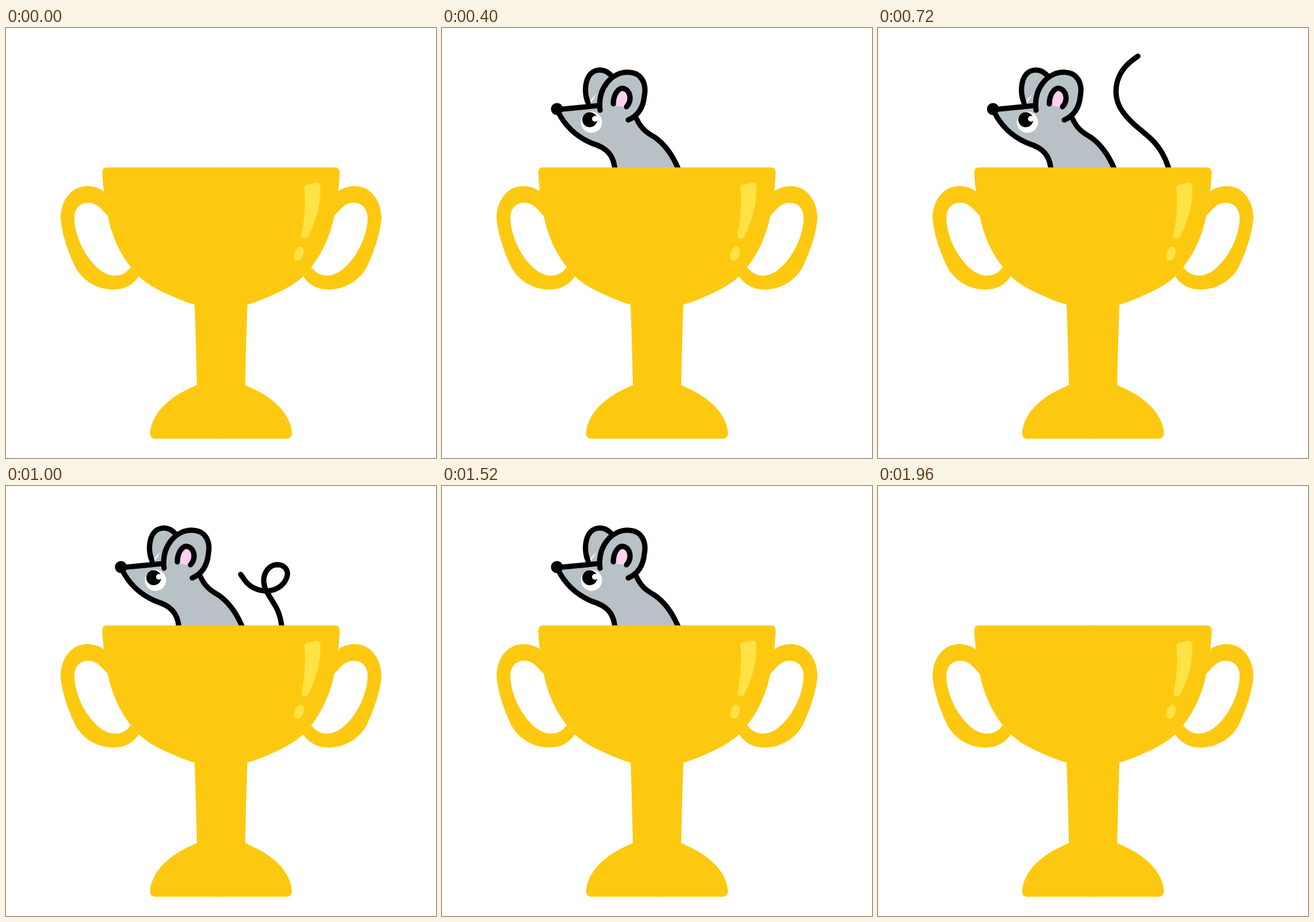
An HTML page that plays this animation: 748x748 px, repeating every 2810 ms.

```html
<!DOCTYPE html>
<html lang="en">
<head>
<meta charset="utf-8">
<title>Mouse in a trophy</title>
<style>
  html, body { margin: 0; width: 100%; height: 100%; overflow: hidden; background: #fff; }
  svg { display: block; }
  .line { fill: none; stroke: #000; stroke-width: 9.2; stroke-linecap: round; stroke-linejoin: round; }
  .fur { fill: #b7c1c6; }
</style>
</head>
<body>
<svg width="100%" height="100%" viewBox="0 0 748 748">
  <!-- Everything in here is hidden below the rim -->
  <svg width="748" height="243" overflow="hidden">
    <path id="tail" class="line"/>
    <g id="mouse">
      <path class="line fur" d="M254 130C245 109 249 74 274 73C285 73 292 79 297 86"/>
      <path class="fur" d="M202 142L256 135L285 90L338 157C346 175 356 182 370 190C390 204 403 224 413 250H301C301 220 285 208 262 201C235 190 215 172 202 146Z"/>
      <path class="line" d="M202 146C215 172 235 190 262 201C285 208 300 220 301 250M338 157C346 175 356 182 370 190C390 204 403 224 413 250"/>
      <path class="fur" d="M275 143C270 105 295 76 325 77C348 78 356 98 352 118C350 140 340 153 324 160Z"/>
      <path class="line" d="M200 142L272 135M275 143C270 105 295 76 325 77C348 78 356 98 352 118C350 140 340 153 324 160"/>
      <path fill="#ffd0f0" d="M303 135C303 119 309 109 315 110C323 113 326 127 319 138Z"/>
      <path class="line" d="M298 132C298 115 307 104 315 105C327 107 332 125 321 137"/>
      <circle cx="200" cy="141" r="10.5"/>
      <circle cx="260" cy="164" r="18.5" fill="#fff"/>
      <circle cx="257" cy="159.500" r="13"/>
      <circle cx="266" cy="158" r="5" fill="#fff"/>
    </g>
  </svg>
  <g fill="#fdc910">
    <g id="half">
      <path d="M376 242.500H175Q167.500 243 167.500 252C168 262 169 273 170 284C172 300 174 314 177 327C184 362 198 392 217 416L231 432C249 449 270 458 290 467Q312 477 328 481C330 530 331 575 332 621C315 629 299 636 286 647C262 665 251 688 250.500 706Q252 714.500 260 714.500H376Z"/>
      <path d="M170 284C160 277 150 275 140 275C112 276 95 302 95 330C96 355 108 390 121 417C135 441 160 455 187 455C207 455 222 446 231 432L217 416C207 430 188 438 165 422C138 402 120 362 119 333C118 316 127 304 143 304C160 304 168 318 177 327Z"/>
    </g>
    <use href="#half" transform="matrix(-1 0 0 1 748 0)"/>
  </g>
  <g fill="#ffe245">
    <path d="M519 277Q520 272 525 272L541 269Q547 270 547 276C548 305 540 335 526 362Q522 367 517 366Q513 363 514 358C518 340 522 310 519 277Z"/>
    <path d="M511 380Q518 380 518 389Q516 404 508 405Q500 404 501 397Q504 382 511 380Z"/>
  </g>
</svg>
<script>
const LOOP = 2810, STEP = 40;
const mouse = document.getElementById('mouse');
const tail = document.getElementById('tail');

// Headings in degrees, evenly spaced from the root of the tail to its tip
const rising = [90, 90, 90, 90, 90, 90, 90, 90, 110, 130, 155, 180];
const upright = [110, 120, 131, 140, 140, 134, 125, 105, 86, 68, 50, 36];
const looped = [95, 107, 123, 120, 88, 42, -20, -105, -145, -178, -205, -235];
const coiled = [106, 88, 10, -65, -125, -180, -188, -213, -240, -275, -312, -362];

const poses = [
  { t: 400, x: 520, y: 470, length: 243, bend: rising },
  { t: 520, x: 520, y: 407, length: 243, bend: rising },
  { t: 720, x: 506, y: 245, length: 243, bend: upright },
  { t: 1000, x: 481, y: 259, length: 276, bend: looped },
  { t: 1240, x: 495, y: 248, length: 276, bend: coiled },
  { t: 1520, x: 525, y: 342, length: 276, bend: coiled }
];

const mix = (a, b, k) => a + (b - a) * k;
const clamp = (v, lo, hi) => Math.min(hi, Math.max(lo, v));

function tailPath(t) {
  if (t <= poses[0].t || t >= poses.at(-1).t) return '';
  const i = poses.findIndex(p => p.t > t);
  const a = poses[i - 1], b = poses[i], k = (t - a.t) / (b.t - a.t);
  const bend = a.bend.map((angle, j) => mix(angle, b.bend[j], k));
  const pieces = 72, piece = mix(a.length, b.length, k) / pieces;
  let x = mix(a.x, b.x, k), y = mix(a.y, b.y, k);
  let d = `M${x} ${y}`;
  for (let n = 0; n < pieces; n++) {
    const pos = clamp((n + 0.5) / pieces * 12 - 0.5, 0, 11);
    const j = Math.min(10, Math.floor(pos));
    const angle = mix(bend[j], bend[j + 1], pos - j) * Math.PI / 180;
    x += piece * Math.cos(angle);
    y -= piece * Math.sin(angle);
    d += `L${x.toFixed(2)} ${y.toFixed(2)}`;
  }
  return d;
}

// 0 = fully up, 1 = inside the cup; the rise waits just short of the top
function mouseDepth(t) {
  const hidden = t < 400 ? 1 - Math.min(t / STEP, 6) / 7 : clamp((t - 1680) / 280, 0, 1);
  return hidden ** 1.25;
}

function draw(now) {
  const t = Math.floor(now % LOOP / STEP) * STEP;
  mouse.setAttribute('transform', `translate(0 ${176 * mouseDepth(t)})`);
  tail.setAttribute('d', tailPath(t));
}

const start = performance.now();
function tick() {
  draw(performance.now() - start);
  requestAnimationFrame(tick);
}
tick();
</script>
</body>
</html>
```
